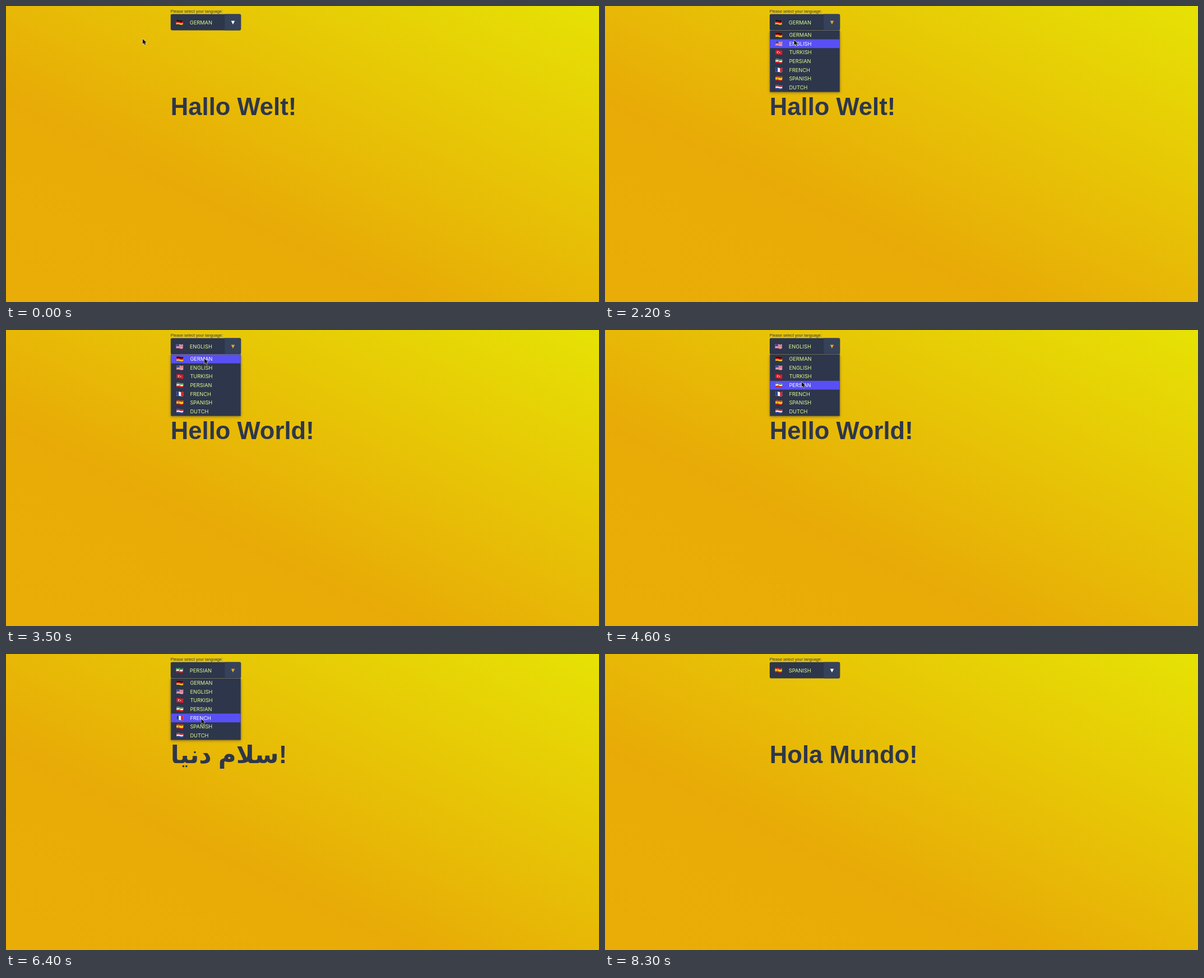
These frames come from a looping animation (1058 by 529 pixels, 9200 ms). An HTML page with a canvas:

```html
<!DOCTYPE html>
<html lang="en">
<head>
<meta charset="utf-8">
<title>Language select</title>
<style>
  html, body { margin: 0; width: 100%; height: 100%; overflow: hidden; }
  canvas { display: block; }
</style>
</head>
<body>
<canvas id="stage"></canvas>
<script>
const W = 1058, H = 529, LOOP = 9200, STEP = 100;
const canvas = document.getElementById('stage');
const ctx = canvas.getContext('2d');
const ratio = window.devicePixelRatio || 1;
canvas.width = W * ratio;
canvas.height = H * ratio;
canvas.style.width = W + 'px';
canvas.style.height = H + 'px';

const NAVY = '#2d364b', LIME = '#dffa90';
const LABEL_FONT = '7.25px "Liberation Sans", Arial, sans-serif';
const TITLE_FONT = 'bold 43.6px "Liberation Sans", "DejaVu Sans", sans-serif';
const ITEM_FONT = '9.25px Inter, sans-serif';
const LIST = { x: 294, y: 43.9, w: 125, row: 15.65 };

const langs = ['GERMAN', 'ENGLISH', 'TURKISH', 'PERSIAN', 'FRENCH', 'SPANISH', 'DUTCH'];
const choices = [
  { from: 0, lang: 0, title: 'Hallo Welt!' },
  { from: 2300, lang: 1, title: 'Hello World!' },
  { from: 4900, lang: 3, title: 'سلام دنیا!' },
  { from: 6900, lang: 5, title: 'Hola Mundo!' }
];
// List open from..to; rows follow the pointer from "hover" on
const openings = [
  { from: 1200, hover: 1900, to: 2300 },
  { from: 3100, hover: 3400, to: 4900 },
  { from: 5800, hover: 6000, to: 6900 }
];
// Pointer path: time, x, y
const path = [
  [400, 243.5, 58.5], [1100, 398.5, 28.5], [1400, 398.5, 28.5],
  [1700, 336.5, 60], [2100, 336.5, 60], [2200, 337, 60.5],
  [2400, 338, 60], [2900, 349.5, 33.5], [3100, 349.5, 33.5], [3200, 348.5, 32.5],
  [3300, 348.5, 32.5], [3500, 353.5, 50.5], [3600, 353.5, 50.5],
  [4200, 351, 142], [4600, 350.5, 92.5], [4900, 350.5, 92.5],
  [5400, 357.5, 60], [5700, 349, 30.5], [5900, 349, 30.5],
  [6400, 348, 115.5], [6700, 346.5, 126], [7400, 346.5, 126], [8100, 49.5, 2.5]
];
const POINTER_END = 8300;

function pointerAt(t) {
  let a = path[0];
  for (const b of path) {
    if (t <= b[0]) {
      const span = b[0] - a[0];
      const u = span ? Math.max(0, (t - a[0]) / span) : 0;
      const k = u * u * (3 - 2 * u);
      return { x: a[1] + (b[1] - a[1]) * k, y: a[2] + (b[2] - a[2]) * k };
    }
    a = b;
  }
  return { x: a[1], y: a[2] };
}

function text(str, x, y, font, color) {
  ctx.font = font;
  ctx.fillStyle = color;
  ctx.fillText(str, x, y);
}

function poly(points, color) {
  ctx.beginPath();
  points.forEach(([x, y]) => ctx.lineTo(x, y));
  ctx.closePath();
  ctx.fillStyle = color;
  ctx.fill();
}

function disc(x, y, r, color) {
  ctx.beginPath();
  ctx.arc(x, y, r, 0, Math.PI * 2);
  ctx.fillStyle = color;
  ctx.fill();
}

const FLAG_W = 12, FLAG_H = 7.4;

// Waving patch of a flag, in fractions of its width and height
function patch(u0, v0, u1, v1, color) {
  const edge = (u, v) => [u * FLAG_W, v * FLAG_H - Math.sin(u * Math.PI * 2) * 0.55];
  const top = [], bottom = [];
  for (let i = 0; i <= 12; i++) {
    const u = u0 + (u1 - u0) * i / 12;
    top.push(edge(u, v0));
    bottom.unshift(edge(u, v1));
  }
  poly(top.concat(bottom), color);
}

function bands(...colors) {
  const n = colors.length;
  patch(0, 0, 1, 1, colors[n - 1]);
  for (let i = n - 2; i >= 0; i--) patch(0, 0, 1, (i + 1) / n, colors[i]);
}

const flags = [
  () => bands('#101010', '#d5181c', '#ffcf1c'),
  () => {
    patch(0, 0, 1, 1, '#eceaf0');
    for (let i = 0; i < 13; i += 2) patch(0, i / 13, 1, (i + 1) / 13, '#d22c45');
    patch(0, 0, 0.46, 0.54, '#3d4b92');
  },
  () => {
    patch(0, 0, 1, 1, '#df1c24');
    disc(4.6, 3.4, 1.9, '#fff');
    disc(5.2, 3.5, 1.5, '#df1c24');
    disc(7.4, 3.9, 0.75, '#fff');
  },
  () => { bands('#229b4a', '#f8f8f8', '#da2028'); disc(6, 3.7, 0.95, '#da2028'); },
  () => {
    patch(0, 0, 1, 1, '#f6f6f6');
    patch(0, 0, 1 / 3, 1, '#273f94');
    patch(2 / 3, 0, 1, 1, '#d92432');
  },
  () => {
    bands('#c91d23', '#ffc91c', '#ffc91c', '#c91d23');
    disc(4, 3.4, 1.1, '#b3612c');
  },
  () => bands('#bd2434', '#f8f8f8', '#2c4a94')
];

function item(lang, x, middle, color) {
  ctx.save();
  ctx.translate(x, middle - FLAG_H / 2);
  flags[lang]();
  ctx.restore();
  text(langs[lang], x + 24.2, middle + 3.4, ITEM_FONT, color);
}

function background() {
  // Gradient towards the lower left corner, equal along the other diagonal
  const k = W * H / (W * W + H * H);
  const dx = k * H, dy = k * W;
  const g = ctx.createLinearGradient(W / 2 + dx, H / 2 - dy, W / 2 - dx, H / 2 + dy);
  g.addColorStop(0, '#e6e205');
  g.addColorStop(0.66, '#e8aa07');
  g.addColorStop(0.7, '#e9ac07');
  g.addColorStop(1, '#eaac07');
  ctx.fillStyle = g;
  ctx.fillRect(0, 0, W, H);
}

function selectBox(lang, active) {
  ctx.save();
  ctx.beginPath();
  ctx.roundRect(293.8, 14.4, 125.4, 29, 2.4);
  ctx.clip();
  ctx.fillStyle = NAVY;
  ctx.fillRect(293, 14, 127, 30);
  ctx.fillStyle = '#36425a';
  ctx.fillRect(390.2, 14, 30, 30);
  ctx.restore();
  item(lang, 303.6, 29.2, LIME);
  poly([[401.7, 26.4], [408.2, 26.4], [404.95, 33]], active ? '#f0a41c' : '#fff');
}

function dropdown(lit) {
  const { x, y, w, row } = LIST, h = row * langs.length;
  ctx.save();
  ctx.shadowColor = 'rgba(0, 0, 0, 0.45)';
  ctx.shadowBlur = 5 * ratio;
  ctx.shadowOffsetY = 1.2 * ratio;
  ctx.fillStyle = '#747672';
  ctx.fillRect(x - 0.2, y - 0.6, w + 0.4, h + 1.1);
  ctx.restore();
  ctx.fillStyle = NAVY;
  ctx.fillRect(x + 0.4, y, w - 0.8, h);
  langs.forEach((_, i) => {
    const on = i === lit;
    if (on) {
      ctx.fillStyle = '#5850f4';
      ctx.fillRect(x + 0.4, y + i * row, w - 0.8, row);
    }
    item(i, 304.2, y + (i + 0.5) * row - 0.1, on ? '#fff' : LIME);
  });
}

function pointer({ x, y }) {
  ctx.save();
  ctx.translate(x, y);
  ctx.lineWidth = 1.1;
  ctx.lineJoin = 'round';
  ctx.strokeStyle = 'rgba(255, 255, 255, 0.85)';
  const shape = [[0.4, 0.4], [0.4, 9.4], [2.5, 7.5], [4.1, 11], [5.7, 10.3], [4.2, 6.9], [7, 6.8]];
  poly(shape, '#111');
  ctx.stroke();
  poly(shape, '#111');
  ctx.restore();
}

function draw(t) {
  const p = pointerAt(t);
  const choice = choices.filter(c => t >= c.from).pop();
  const opening = openings.find(o => t >= o.from && t < o.to);
  const over = p.x > 294 && p.x < 419 && p.y > 14 && p.y < 43.5;

  ctx.setTransform(ratio, 0, 0, ratio, 0, 0);
  ctx.direction = 'ltr';
  background();
  text('Please select your language:', 293.8, 11.5, LABEL_FONT, NAVY);
  text(choice.title, 293.8, 194.5, TITLE_FONT, NAVY);
  selectBox(choice.lang, over || !!opening);
  if (opening) {
    const row = Math.floor((p.y - LIST.y) / LIST.row);
    const hovering = t >= opening.hover && row >= 0 && row < langs.length;
    dropdown(hovering ? row : choice.lang);
  }
  if (t < POINTER_END) pointer(p);
}

function tick(now) {
  draw(Math.floor(now % LOOP / STEP) * STEP);
  requestAnimationFrame(tick);
}
draw(0);
requestAnimationFrame(tick);
</script>
</body>
</html>
```
